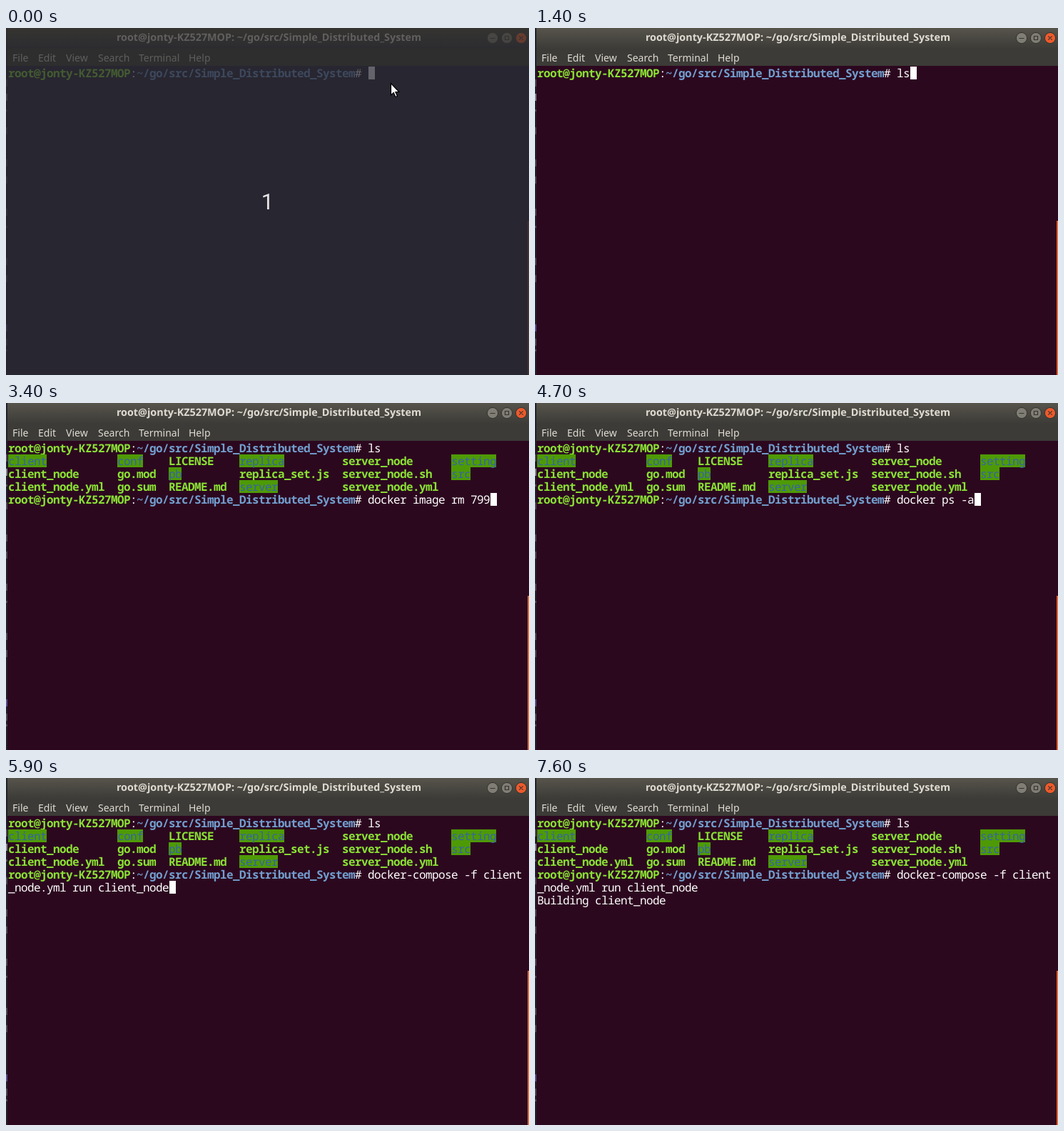
Animation of 733x486 px, one loop 8000 ms. Source, as an HTML page:

```html
<!DOCTYPE html>
<html lang="en">
<head>
<meta charset="utf-8">
<title>Terminal</title>
<style>
  html, body { margin: 0; width: 100%; height: 100%; overflow: hidden; background: #2c081f; }
  #stage { position: relative; width: 733px; height: 486px; overflow: hidden; background: #2c081f; }
  #stage > * { position: absolute; }
  .title {
    left: 0; top: 0; width: 733px; height: 29px;
    background: linear-gradient(#56544b, #3c3b37);
    font: 600 14.35px/28px "Noto Sans", "Open Sans", sans-serif;
    color: #dfdbd2; text-align: center; text-rendering: geometricPrecision;
  }
  .title span { position: relative; left: 2px; white-space: pre; }
  .menu {
    left: 1px; top: 29px; width: 732px; height: 24px; background: #3c3b37;
    font: 14px/25px "Noto Sans", "Open Sans", sans-serif; color: #dfdbd2;
  }
  .menu span { position: absolute; top: 0; }
  #buttons { left: 670px; top: 0; }
  #term {
    left: 3px; top: 54px;
    font: 16px/18px "Noto Sans Mono", "DejaVu Sans Mono", monospace;
    letter-spacing: calc(9px - 1ch);
    color: #fff; white-space: pre; text-rendering: geometricPrecision;
  }
  .row { height: 18px; }
  .user, .file { color: #8ae234; font-weight: 700; }
  .path { color: #729fcf; font-weight: 700; }
  .dir {
    display: inline-block; height: 18px; vertical-align: top;
    color: #3465a4; background: #4e9a06;
  }
  #cursor { width: 9px; height: 18px; background: #fff; }
  .edge { left: 0; top: 0; width: 2px; height: 486px; background: #20222c; }
  .edge i { position: absolute; left: 0; width: 2px; background: #4c4d55; }
  .accent { left: 731px; top: 270px; width: 2px; height: 216px; background: #dc6335; }
  #count {
    left: 0; top: 224px; width: 733px; text-align: center;
    font: 31px/40px Roboto, "Open Sans", sans-serif; color: #e4e4e6;
  }
  #arrow, #beam { left: 0; top: 0; }

  .intro#stage { background: #282630; }
  .intro .title { background: linear-gradient(#353431, #2c2c30); }
  .intro .menu { background: #2e2e2f; }
  .intro .title span, .intro .menu span { opacity: .27; }
  .intro #term, .intro #cursor, .intro #buttons { opacity: .28; }
  .intro .edge { opacity: .25; }
  .intro .accent { opacity: .15; }
</style>
</head>
<body>
<div id="stage">
  <div class="title"><span>root@jonty-KZ527MOP: ~/go/src/Simple_Distributed_System</span></div>
  <div class="menu">
    <span style="left:8px">File</span>
    <span style="left:44px">Edit</span>
    <span style="left:83px">View</span>
    <span style="left:128px">Search</span>
    <span style="left:185px">Terminal</span>
    <span style="left:255px">Help</span>
  </div>
  <svg id="buttons" width="63" height="29" fill="none" stroke="#35342f">
    <circle cx="12" cy="14" r="7.6" fill="#7f7d74"/>
    <circle cx="32" cy="14" r="7.6" fill="#7f7d74"/>
    <circle cx="52" cy="14" r="7.6" fill="#ee5a2c"/>
    <path d="M8.5 14.5h7M29.5 11.5h5v5h-5zM49.3 11.3l5.4 5.4m0-5.4l-5.4 5.4" stroke-width="1.2"/>
  </svg>
  <div class="edge" id="edge"></div>
  <div class="accent"></div>
  <div id="term"></div>
  <div id="cursor"></div>
  <svg id="beam" width="733" height="100" fill="none">
    <path d="M538.5 73.5h2l1 1 1-1h2M541.5 74.5v12M538.5 87.5h2l1-1 1 1h2" stroke="#000" stroke-width="2.4" opacity=".6"/>
    <path d="M538.5 73.5h2l1 1 1-1h2M541.5 74.5v12M538.5 87.5h2l1-1 1 1h2" stroke="#d8d8d8"/>
  </svg>
  <svg id="arrow" width="733" height="110">
    <path d="M539.5 77.5v16.5l3.8-3.5 2.6 6 2.6-1.1-2.6-5.9h5z" fill="#fff" stroke="#000" stroke-width="1.2"/>
  </svg>
  <div id="count">1</div>
</div>
<script>
const LOOP = 8000, CELL = 9, LINE = 18, LEFT = 3, TOP = 54, COLS = 80;
const INTRO_END = 100, LISTED = 1900, BEAM_END = 1000;
const $ = id => document.getElementById(id);

const remove = "docker rm $(docker ps -aq)";
const compose = "docker-compose -f client_node.yml run client_node";

// [ms, typed text, cursor visible, lines printed after the command]
const steps = [
  [0, "", 1], [400, "", 0], [1000, "l", 1], [1400, "ls", 1],
  [1900, "", 1], [2600, "", 0], [2800, "", 1], [2900, "ls", 1],
  [3200, "clear", 1], [3400, "docker image rm 799", 1],
  [4000, "docker images", 1], [4300, "docker ps -a", 1],
  [4500, remove, 1], [4700, "docker ps -a", 1],
  [4900, compose, 1], [5000, "clear", 1], [5200, "ls", 1], [5600, "clear", 1],
  [5900, compose, 1], [6400, compose, 0], [7000, compose, 1],
  [7100, compose, 1, []],
  [7400, compose, 1, ["Building client_node"]],
  [7600, compose, 0, ["Building client_node"]]
];

const tabs = [0, 17, 25, 36, 52, 69];
const listing = [
  "client/ conf/ LICENSE replica/ server_node setting/",
  "client_node go.mod pb/ replica_set.js server_node.sh src/",
  "client_node.yml go.sum README.md server/ server_node.yml"
];

const span = (cls, text) => `<span class="${cls}">${text}</span>`;
const row = html => `<div class="row">${html}</div>`;
const prompt = span("user", "root@jonty-KZ527MOP") + ":" +
  span("path", "~/go/src/Simple_Distributed_System") + "# ";
const PROMPT_LEN = 56;

function listRow(line) {
  let html = "", col = 0;
  line.split(" ").forEach((item, i) => {
    const name = item.replace("/", "");
    html += " ".repeat(tabs[i] - col) + span(name === item ? "file" : "dir", name);
    col = tabs[i] + name.length;
  });
  return row(html);
}

const files = listing.map(listRow).join("");

function commandRows(text) {
  const room = COLS - PROMPT_LEN;
  return row(prompt + text.slice(0, room)) +
    (text.length > room ? row(text.slice(room)) : "");
}

let shown = null;
function draw(t) {
  const step = steps.findLast(s => s[0] <= t);
  const intro = t < INTRO_END;
  $("stage").className = intro ? "intro" : "";
  $("count").hidden = !intro;
  $("arrow").style.display = intro ? "" : "none";
  $("beam").style.display = !intro && t < BEAM_END ? "" : "none";
  if (step === shown) return;
  shown = step;

  const [start, text, visible, output] = step;
  const listed = start >= LISTED;
  $("term").innerHTML = (listed ? commandRows("ls") + files : "") +
    commandRows(text) + (output || []).map(row).join("");

  const end = PROMPT_LEN + text.length;
  let line = (listed ? 4 : 0) + Math.floor(end / COLS), col = end % COLS;
  if (output) { line += 1 + output.length; col = 0; }
  const style = $("cursor").style;
  style.left = LEFT + 0.5 + col * CELL + "px";
  style.top = TOP + line * LINE + "px";
  style.visibility = visible ? "visible" : "hidden";
}

// Slivers of the window behind, along the left edge
$("edge").innerHTML = [72, 92, 114, 139, 184, 208, 253, 277, 322, 346, 415, 435, 450]
  .map((y, i) => `<i style="top:${y}px;height:${i % 5 === 2 ? 3 : 10}px;` +
    `background:${y === 92 ? "#85868c" : y === 415 ? "#59508c" : "#4c4d55"}"></i>`).join("");

const origin = performance.now();
function tick() {
  draw((performance.now() - origin) % LOOP);
  requestAnimationFrame(tick);
}
tick();
</script>
</body>
</html>
```
